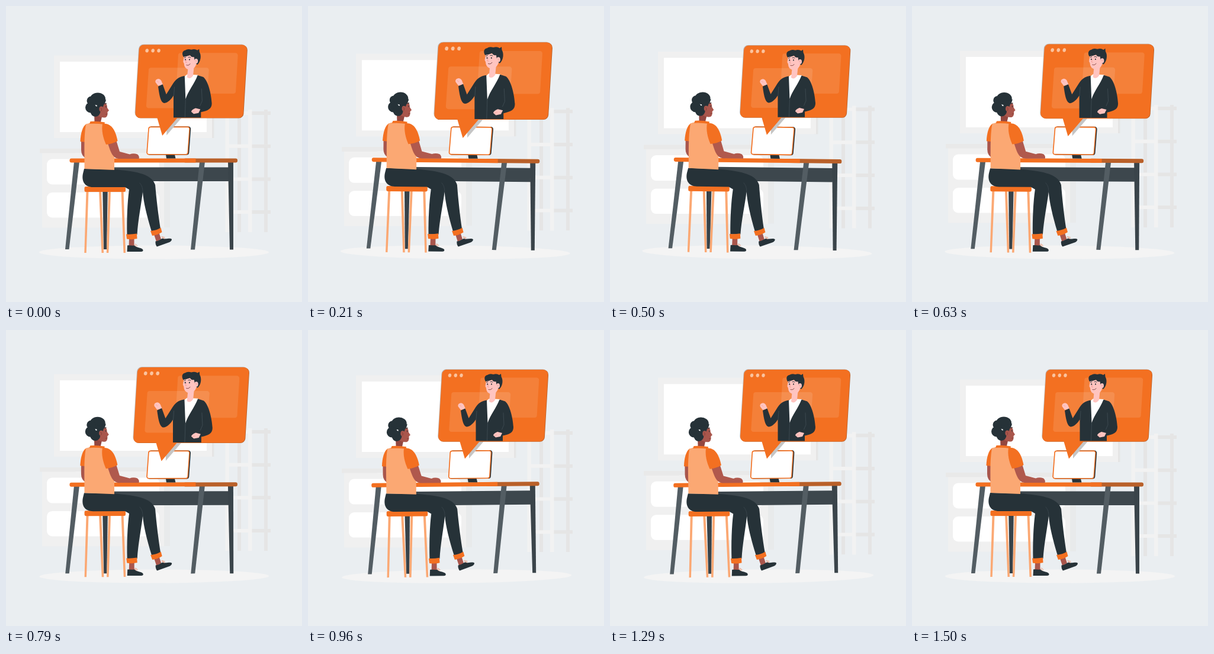
Write an HTML page with a canvas that moves like this. It is 500x500 px and loops after 1.54 s.

```html
<!DOCTYPE html>
<html lang="en">
<head>
<meta charset="utf-8">
<title>Video call</title>
<style>
  html, body { margin: 0; width: 100%; height: 100%; overflow: hidden; background: #eaeef1; }
  canvas { display: block; width: 500px; height: 500px; }
</style>
</head>
<body>
<canvas id="stage"></canvas>
<script>
const LOOP = 1540, FRAME = 1000 / 24, CYCLE = 36;
const canvas = document.getElementById('stage');
const ctx = canvas.getContext('2d');
const dpr = window.devicePixelRatio || 1;
canvas.width = canvas.height = 500 * dpr;

const C = {
  orange: '#f37021', rust: '#b96029', peach: '#fba873', ink: '#263238',
  skin: '#a9564c', skinDark: '#934740', pink: '#ffc4c0', pale: '#f2f2f2', shade: '#e5e5e5'
};

function fill(color, d) {
  ctx.fillStyle = color;
  ctx.fill(new Path2D(d));
}
function line(color, width, d) {
  ctx.strokeStyle = color;
  ctx.lineWidth = width;
  ctx.lineCap = ctx.lineJoin = 'round';
  ctx.stroke(new Path2D(d));
}
function box(color, x, y, w, h, r = 0) {
  ctx.fillStyle = color;
  ctx.beginPath();
  ctx.roundRect(x, y, w, h, r);
  ctx.fill();
}
function oval(color, x, y, rx, ry = rx, turn = 0) {
  ctx.fillStyle = color;
  ctx.beginPath();
  ctx.ellipse(x, y, rx, ry, turn, 0, Math.PI * 2);
  ctx.fill();
}
// Rounded parallelogram: the bottom edge is shifted left by `lean`.
function slanted(color, x, y, w, h, lean, r) {
  const pts = [[x, y], [x + w, y], [x + w - lean, y + h], [x - lean, y + h]];
  ctx.fillStyle = color;
  ctx.beginPath();
  ctx.moveTo(x + w / 2, y);
  for (const i of [1, 2, 3, 0]) ctx.arcTo(...pts[i], ...pts[(i + 1) % 4], r);
  ctx.closePath();
  ctx.fill();
}
function group(transform, draw) {
  ctx.save();
  transform();
  draw();
  ctx.restore();
}

function drawRoom() {
  box(C.shade, 345, 84, 6.5, 139);
  box('#f0f0f0', 81, 83.5, 267, 139.5);
  box('#fff', 91, 94, 248, 119);

  box('#f0f0f0', 61, 246, 206, 128.5);
  box('#e8eaeb', 267, 248, 10, 126);
  box('#e9e9e9', 57, 241, 213, 7.5);
  box('#f0f0f0', 117, 248, 150, 8);
  box('#fff', 69, 258.5, 190, 43, 9);
  box('#fff', 69, 315, 190, 42.5, 9);

  box(C.shade, 391, 175, 6, 207);
  box(C.shade, 436, 175, 6, 207);
  for (let i = 0; i < 4; i++) {
    const y = 178 + i * 55.7;
    box(C.shade, 412, y, 35, 6);
    box(C.pale, 373, y, 39, 6);
  }
  box(C.pale, 370.5, 175, 6.5, 207);
  box(C.pale, 409, 175, 6.5, 207);
}

function drawDesk() {
  fill('#3d474d', 'M160 272.5H376V296L160 296Z');
  fill('#374249', 'M163 300H172L170 411H165Z');
  fill('#535d63', 'M115 263H124L106.500 411H100Z');
  fill('#3a444a', 'M375 263H384V411.500H378Z');
  fill('#535d63', 'M327 263H336L319 411.500H312Z');
  box(C.rust, 300, 257.5, 91, 7, 3);
  box(C.orange, 107.5, 257.5, 213, 7, [3, 0, 0, 3]);
  fill(C.ink, 'M270 251H285L286.500 257.500H271Z');
}

function drawMonitor() {
  slanted(C.ink, 242, 203.5, 70.5, 48, 3.5, 4);
  slanted(C.orange, 240.5, 203.5, 70.5, 48, 3.5, 4);
  slanted('#fff', 242, 205.3, 67.5, 44.6, 3.2, 2.5);
}

function drawStool() {
  fill(C.peach, 'M135.500 312H139.500L135.700 417H132.300ZM157 312H161L165 417H161.500ZM173 312H177L173.300 417H169.800ZM194.500 312H198.500L202 417H198.500Z');
  box(C.orange, 132.5, 305, 69.5, 9, 2.5);
}

function drawStudent() {
  // Feet
  fill(C.skin, 'M208 392H216.500V406H207.500ZM250 386L258.500 383L262 394L254 398Z');
  fill(C.ink, 'M205 404.500C209 404 213 405 217 404.500C221 409 230 408 231.500 412Q232 415 228 415H204.500ZM252.500 397.500C257 397 261 394 264.500 392.500C269 395 277 391 280 394Q280 397 276 399L255 406.500Q252 403 252.500 397.500Z');
  line('#eaa083', 1, 'M217 403L220 406M218.500 402L222 405M263.500 391L267.500 393M263 389.500L268 391');

  // Trousers
  fill(C.ink, 'M132 275L183 276C214 279 246 282 252 302C254 325 257 352 261 377L246 381C238 355 232 330 231 314C228 338 223 362 221.500 386H204.500C204 360 205 332 208 310L201 306H147C134 306 127 297 130 283Z');
  line('#3b474e', .8, 'M231 314C231 306 229 303 226 299');
  fill(C.orange, 'M203 385.500Q212 386 221 384.500L221.500 393Q213 395 204 393.500ZM244 380Q254 379 261.500 374.500L263.500 382Q256 387 247 388Z');

  // Far arm, torso and near arm
  fill(C.skin, 'M127 227H134.500L135 257Q127 253 127 243Z');
  fill(C.orange, 'M136 199C129 203 126 216 125.500 229L135 230Z');
  fill(C.peach, 'M135 200Q138 198 144 197.500L167 198.500C177 204 183 225 183 240V277L132.500 275C133 250 131 222 135 200Z');
  fill(C.skinDark, 'M149 181H163.500L160 196Q154 198 149.500 196Z');
  fill(C.orange, 'M142.500 195Q154 194 167 196.500L166 200Q153 198 141 199Z');
  fill('#b0594d', 'M172 232L186.500 228L192 246L209 250.500Q215 248 222 250.500Q226 254 224.500 258H194C180 259 177 247 172 232Z');
  fill(C.orange, 'M163 199C178 197 185 210 188.500 228Q180 233 169 234C164 223 161 210 163 199Z');

  // Head
  fill(C.skin, 'M156 164H169Q171 168 171 172L174 176.500L171.500 179C172 186 170 189 165 188.500Q158 188 154 184Z');
  oval(C.ink, 155, 157, 13, 10.5);
  oval(C.ink, 144, 160, 7.5);
  oval(C.ink, 143, 171.5, 9);
  oval(C.ink, 151, 178, 8.5, 9);
  fill(C.ink, 'M153 162L169 158Q168 164 165 167L163 173L155 180Z');
  oval(C.skin, 161, 174, 3.6, 4.5);
  line('#773530', .7, 'M160 172Q163 174 161 177M168.500 183L171 182.500');
  line(C.ink, 1, 'M167 165.500L169.500 164.500M168.800 169.500V171');
}

function drawBubble() {
  fill('#c5c5c5', 'M272 188H297L272 217Z');
  slanted('#bdb3ae', 226, 66.2, 179, 121.4, 7.2, 8);
  slanted(C.rust, 227.4, 67.3, 179.2, 121.4, 7.2, 8);
  slanted(C.orange, 226.8, 67, 179, 121.2, 7.2, 8);
  fill(C.orange, 'M256 187H291L265 217.500Z');
  slanted('rgba(255,255,255,.11)', 242.5, 105, 100, 67, 4.5, 4);
  slanted('rgba(255,255,255,.11)', 291.5, 80.5, 99, 67.5, 4, 4);
  for (const x of [239.5, 249.3, 259]) oval('#fbc39e', x, 76.6, 2.7, 3.1, .2);
}

function drawSpeaker() {
  // Shirt, neck and raised hand
  fill('#fff', 'M301 120L306 116L324 117L327 124L306 158H302Z');
  fill(C.pink, 'M308 101L318 98L316 118Q311 125 306 121Z');
  fill(C.pink, 'M258 135L253.500 129Q253 125 256 124Q260 122 263 126L266 133Z');

  // Jacket
  fill(C.ink, 'M302 118.500C292 120 287 124 281 134L271.500 149L265.500 132.500L258 136C260 150 262 163 268.500 163.500C274 163 280 157 283.500 151V187.600H329V178.500C341 176 347 173 347 164C346 148 341 127 333 120.500L323.500 117.500C318 132 308 143 303.500 157Z');
  line('#455259', .7, 'M303.500 157L302.500 187M330 140L331 160L327.500 168M284 151L285 137');
  fill(C.pink, 'M328 174L320 172Q313 175 313 178L317 181.500L325 180Z');
  line('#f0a09d', .7, 'M315 178.500L319 177M256 127L259 129');

  // Head
  fill(C.pink, 'M301 85L321 84L322 96C320 105 316 108 309 108C303 107 301 102 301 98L299.500 95Z');
  fill(C.ink, 'M300 87C297 82 298 77 303 76Q307 73 313 75Q319 73 323 76L326 74L326.500 79C330 84 329 95 323 100L319 96L317.500 87Q313 88 311 84Q306 86 300 87Z');
  oval(C.pink, 321, 94, 3, 4);
  line('#ed9994', .8, 'M320 93Q322 92 321 95M304.500 92L303.500 96L305.500 96.500');
  line('#7c3e3e', .9, 'M305 100.500Q309 102 311 98.500');
  line(C.ink, .9, 'M301.500 88.500L304 87.500M308 87.500Q310 86.500 312 88');
  oval(C.ink, 303.2, 91.5, .9, 1.2);
  oval(C.ink, 310, 91.5, .9, 1.2);
}

// Straight-line interpolation through [position, value] keys.
function keyed(keys, p) {
  const i = Math.max(1, keys.findIndex(k => k[0] >= p));
  const [a, u] = keys[i - 1], [b, v] = keys[i];
  return u + (v - u) * (p - a) / (b - a);
}
const FLOAT = [[0, 0], [18, -9.6], [36, 0]];
const SWAY = [[0, 0], [9, 1], [27, -1], [36, 0]];
const BEAT = [[-1, 1], [3.9, 1.09], [9.6, 1.003], [13.4, 1.002], [17.4, 1.077], [22.3, 1], [36, 1]];

function render(ms) {
  const step = Math.min(CYCLE, Math.floor((ms % LOOP + 5) / FRAME));
  ctx.setTransform(dpr, 0, 0, dpr, 0, 0);
  ctx.fillStyle = '#eaeef1';
  ctx.fillRect(0, 0, 500, 500);

  group(() => ctx.translate(0, keyed(FLOAT, step)), drawRoom);

  group(() => {
    ctx.translate(250, 288);
    ctx.rotate(keyed(SWAY, step) * Math.PI / 180);
    ctx.translate(-250, -288);
  }, () => {
    oval('#f4f4f4', 250, 416, 194, 11.5);
    drawDesk();
    drawMonitor();
    drawStool();
    drawStudent();
  });

  group(() => {
    const s = keyed(BEAT, step);
    ctx.translate(312.5, 142);
    ctx.scale(s, s);
    ctx.translate(-312.5, -142);
  }, () => {
    drawBubble();
    drawSpeaker();
  });
}

const start = performance.now();
function tick() {
  render(performance.now() - start);
  requestAnimationFrame(tick);
}
tick();
</script>
</body>
</html>
```
